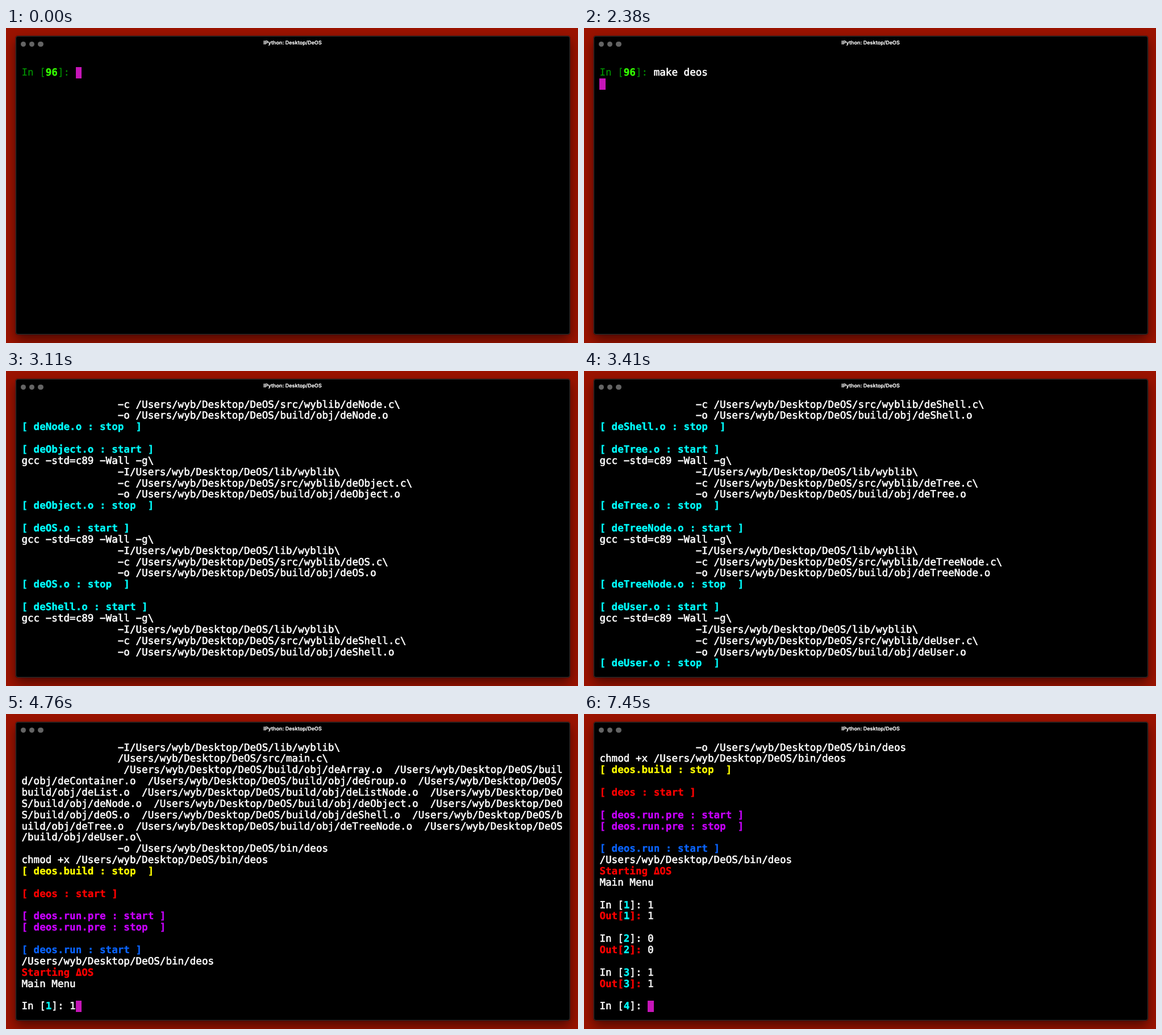
Animation of 1007x556 px, one loop 8 s. Source, as an HTML page:

```html
<!DOCTYPE html>
<html lang="en">
<head>
<meta charset="utf-8">
<title>Terminal</title>
<style>
  html, body { margin: 0; width: 100%; height: 100%; overflow: hidden; background: #9b1300; }
  #window {
    position: absolute; left: 17px; top: 14px; width: 976px; height: 527px; box-sizing: border-box;
    background: #000; border: 1px solid #333; border-radius: 4px;
    box-shadow: 0 0 0 1px rgba(0, 0, 0, .3), 0 9px 20px rgba(0, 0, 0, .5);
  }
  .dot { position: absolute; top: 23.5px; width: 9.4px; height: 9.4px; border-radius: 50%; background: #646464; }
  #title {
    position: absolute; left: 0; top: 20px; width: 1009px; text-align: center; color: #fff;
    font: 600 9px/14px Inter, sans-serif; text-rendering: geometricPrecision;
    -webkit-text-stroke: .2px currentColor;
  }
  #screen {
    position: absolute; left: 27.4px; top: 50.6px;
    margin: 0; color: #fff; white-space: pre; text-rendering: geometricPrecision;
    font: 17.58px/19.86px "DejaVu Sans Mono", monospace; font-variant-ligatures: none;
    -webkit-text-stroke: .6px currentColor;
  }
  #screen div { height: 19.86px; }
  #screen b { -webkit-text-stroke-width: .35px; }
  #screen .green { -webkit-text-stroke-width: .2px; }
  #cursor { position: absolute; width: 10.58px; height: 19.86px; background: #c615b8; }
  .green { color: #009200; }
  .lime { color: #34ff00; }
  .cyan { color: #0ff; }
  .yellow { color: #ff0; }
  .red { color: #f00; }
  .purple { color: #c800ff; }
  .blue { color: #0a64ff; }
</style>
</head>
<body>
<div id="window"></div>
<div class="dot" style="left:25.8px"></div>
<div class="dot" style="left:41.1px"></div>
<div class="dot" style="left:56.4px"></div>
<div id="title">IPython: Desktop/DeOS</div>
<div id="cursor"></div>
<pre id="screen"></pre>
<script>
const ROWS = 24, COLS = 90, LEFT = 27.4, TOP = 49.6, CELL_W = 10.583, CELL_H = 19.86, LOOP = 8000;
const HOME = '/Users/wyb/Desktop/DeOS', LIB = 'wyblib';
const INDENT = ' '.repeat(16);
const UNITS = 'Array Container Group List ListNode Node Object OS Shell Tree TreeNode User'
  .split(' ').map(name => 'de' + name);

const log = [], states = [];
const print = (...lines) => log.push(...lines);
const amend = line => { log[log.length - 1] = line; };
const bold = (color, text) => `<b class="${color}">${text}</b>`;
const start = (color, name) => bold(color, `[ ${name} : start ]`);
const stop = (color, name) => bold(color, `[ ${name} : stop  ]`);

// Records the visible rows; without a column the cursor is hidden.
const show = (time, col = -1) => {
  const rows = log.slice(-ROWS);
  states.push({ time, rows, col, row: rows.length - 1 });
};

const compile = unit => print(
  start('cyan', unit + '.o'),
  'gcc -std=c89 -Wall -g\\',
  `${INDENT}-I${HOME}/lib/${LIB}\\`,
  `${INDENT}-c ${HOME}/src/${LIB}/${unit}.c\\`,
  `${INDENT}-o ${HOME}/build/obj/${unit}.o`,
  stop('cyan', unit + '.o'));

// Typing the command
const shell = `<span class="green">In [</span>${bold('lime', 96)}<span class="green">]: </span>`;
print('', shell);
show(0, 9);
const command = 'make deos';
[900, 1050, 1190, 1340, 1630, 1780, 1930, 2230].forEach((time, i) => {
  amend(shell + command.slice(0, i + 2));
  show(time, 11 + i);
});
print('');
show(2380, 0);

// Compiling
print(start('cyan', 'deos.clean'), `rm -rf ${HOME}/bin/deos*`,
  `rm -rf ${HOME}/build/obj/*.o`, stop('cyan', 'deos.clean'), '');
const finished = { deArray: 2520, deGroup: 2670, deListNode: 2820, deUser: 3410 };
const running = { deShell: 3110, deTree: 3260 };
for (const unit of UNITS) {
  compile(unit);
  if (finished[unit]) show(finished[unit]);
  if (running[unit]) {
    const done = log[log.length - 1];
    amend('');
    show(running[unit]);
    amend(done);
  }
  print('');
  if (unit === 'deObject') show(2960);
}

// Linking
const objects = INDENT + ' ' + UNITS.map(unit => `${HOME}/build/obj/${unit}.o`).join('  ') + '\\';
print(start('yellow', 'deos.build'), 'gcc -std=c89 -Wall -g\\',
  `${INDENT}-I${HOME}/lib/${LIB}\\`, `${INDENT}${HOME}/src/main.c\\`,
  ...objects.match(new RegExp(`.{1,${COLS}}`, 'g')),
  `${INDENT}-o ${HOME}/bin/deos`);
show(3560);

// Running
const ask = n => `In [${bold('cyan', n)}]: `;
const answer = n => bold('red', 'Out[') + bold('cyan', n) + bold('red', ']: ');
print(`chmod +x ${HOME}/bin/deos`, stop('yellow', 'deos.build'), '',
  start('red', 'deos'), '',
  start('purple', 'deos.run.pre'), stop('purple', 'deos.run.pre'), '',
  start('blue', 'deos.run'), `${HOME}/bin/deos`,
  bold('red', 'Starting ΔOS'), 'Main Menu', '', ask(1));
show(3710, 8);
[[4760, 5210, 1], [5810, 6560, 0], [7000, 7450, 1]].forEach(([typed, entered, value], i) => {
  amend(ask(i + 1) + value);
  show(typed, 9);
  print(answer(i + 1) + value, '', ask(i + 2));
  show(entered, 8);
});

const screen = document.getElementById('screen');
const cursor = document.getElementById('cursor');
// Wide dash and centred asterisk, as terminal fonts draw them
const glyphs = line => line.replace(/-/g, '\u2212').replace(/\*/g, '\u2217');
let current;

function draw(state) {
  screen.innerHTML = state.rows.map(line => `<div>${glyphs(line)}</div>`).join('');
  cursor.style.display = state.col < 0 ? 'none' : 'block';
  cursor.style.left = `${LEFT + state.col * CELL_W}px`;
  cursor.style.top = `${TOP + state.row * CELL_H}px`;
}

const origin = performance.now();
function tick() {
  const time = (performance.now() - origin) % LOOP;
  const state = states.filter(s => s.time <= time).pop();
  if (state !== current) draw(current = state);
  requestAnimationFrame(tick);
}
tick();
</script>
</body>
</html>
```
